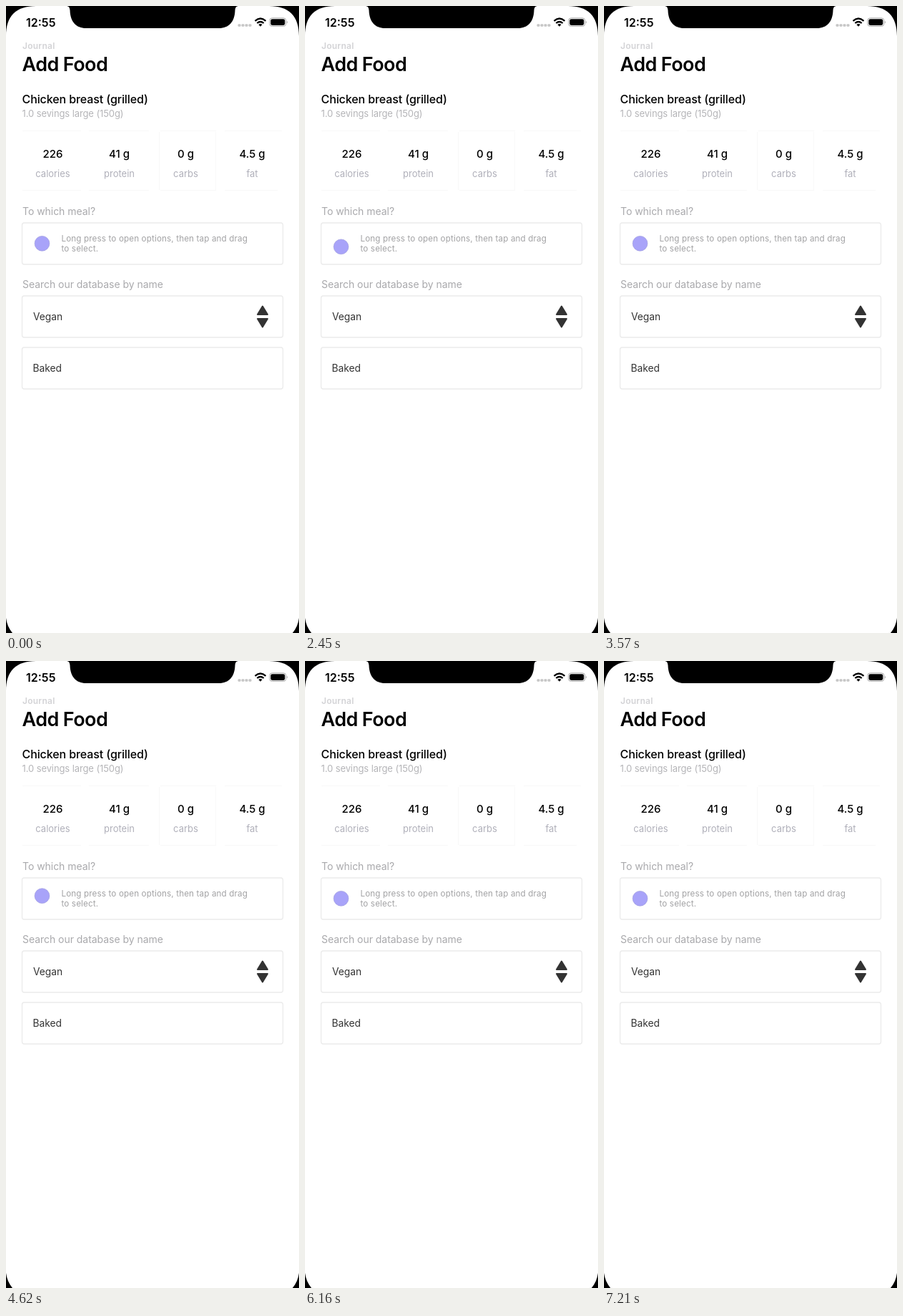
Recreate the animation shown at these times as an HTML page. Size 410 by 876 pixels, loop 8000 ms.

```html
<!DOCTYPE html>
<html lang="en">
<head>
<meta charset="utf-8">
<title>Add Food</title>
<style>
  html, body { margin: 0; width: 100%; height: 100%; overflow: hidden; background: #fff; }
  svg { display: block; width: 410px; height: 876px; }
  text { font-family: Inter, Roboto, sans-serif; fill: #a9a9ac; }
  .time { font-size: 16px; font-weight: 600; fill: #000; }
  .crumb { font-size: 12px; font-weight: 600; fill: #d3d3d6; letter-spacing: .25px; }
  .title { font-size: 27px; font-weight: 600; fill: #000; letter-spacing: -.6px; }
  .food { font-size: 16px; font-weight: 500; fill: #000; letter-spacing: -.1px; }
  .size { font-size: 13px; fill: #b5b5b8; letter-spacing: -.1px; }
  .label { font-size: 14px; letter-spacing: -.04px; }
  .hint { font-size: 11.6px; fill: #a2a2a4; letter-spacing: .16px; }
  .field { font-size: 13.8px; fill: #333; }
  .value { font-size: 15px; font-weight: 500; fill: #000; text-anchor: middle; }
  .unit { font-size: 13px; fill: #b0b0ba; text-anchor: middle; }
  .card { fill: #fff; stroke: #ebebeb; stroke-width: 1.3; }
  .faint { fill: none; stroke: #f8f8f8; stroke-width: 1.2; }
</style>
</head>
<body>
<svg viewBox="0 0 410 876" xmlns="http://www.w3.org/2000/svg">
  <defs>
    <clipPath id="cardClip"><rect x="23" y="302.5" width="365" height="58.5"/></clipPath>
  </defs>
  <rect width="410" height="876" fill="#fff"/>

  <!-- phone bezel and notch -->
  <path d="M0 0H42C14 0 0 14 0 42ZM410 0H368C396 0 410 14 410 42ZM0 855C1 863 4 870 9 876H0ZM410 855C409 863 406 870 401 876H410Z"/>
  <path d="M84 0C88 0 89 2 89.500 6C90 22 98 31 112 31H298C312 31 320 22 320.500 6C321 2 322 0 326 0Z"/>

  <!-- status bar -->
  <text class="time" x="28" y="28.500">12:55</text>
  <g fill="#c6c6c6">
    <rect x="324.500" y="25.300" width="4" height="3.400" rx="1.200"/>
    <rect x="329.500" y="25.300" width="4" height="3.400" rx="1.200"/>
    <rect x="334.500" y="25.300" width="4" height="3.400" rx="1.200"/>
    <rect x="339.500" y="25.300" width="4" height="3.400" rx="1.200"/>
  </g>
  <g fill="none" stroke="#000" stroke-width="2.200">
    <path d="M348.500 20.800Q356 14.200 363.500 20.800"/>
    <path d="M351.300 24Q356 20 360.700 24"/>
  </g>
  <path d="M353.400 26Q356 23.900 358.600 26L356 28.700Z"/>
  <rect x="368.800" y="16.800" width="23" height="11.600" rx="3.600" fill="#fff" stroke="#aaa"/>
  <rect x="370.300" y="18.300" width="20" height="8.600" rx="2.300"/>
  <path d="M393 20.700Q395 22.600 393 24.500Z" fill="#aaa"/>

  <text class="crumb" x="23" y="59.500">Journal</text>
  <text class="title" x="22.500" y="91">Add Food</text>
  <text class="food" x="22.500" y="136">Chicken breast (grilled)</text>
  <text class="size" x="22.500" y="155">1.0 sevings large (150g)</text>

  <path class="faint" d="M23 174.500H105M116 174.500H200M216 174.500H294M306 174.500H386M23 257.500H105M116 257.500H200M216 257.500H294M306 257.500H380M214.500 176V257M293.500 176V257"/>
  <g id="macros"></g>

  <text class="label" x="23" y="292">To which meal?</text>
  <rect class="card" x="22.500" y="303" width="365" height="58" rx="3"/>
  <g clip-path="url(#cardClip)">
    <circle id="dot" cx="50.500" cy="331.800" r="10.400" fill="#a8a3f9" stroke="#a09cdf" stroke-width=".7"/>
    <circle id="ring" cx="50.500" cy="332" r="0" fill="#28b496"/>
  </g>
  <text class="hint" x="77.500" y="329">Long press to open options, then tap and drag</text>
  <text class="hint" x="77.500" y="343">to select.</text>

  <text class="label" x="23" y="394">Search our database by name</text>
  <rect class="card" x="22.500" y="405" width="365" height="58" rx="3"/>
  <text class="field" x="38" y="439">Vegan</text>
  <path d="M359 419.500L366 431H352ZM359 448.500L366 437H352Z" fill="#333" stroke="#333" stroke-width="2" stroke-linejoin="round"/>
  <rect class="card" x="22.500" y="477" width="365" height="58" rx="3"/>
  <text class="field" x="37.500" y="511">Baked</text>
</svg>
<script>
  const LOOP = 8000, STEP = 70, CYCLE = 3640;
  const dot = document.getElementById('dot');
  const ring = document.getElementById('ring');

  const macros = [[65.5, '226', 'calories'], [158.5, '41 g', 'protein'], [251.5, '0 g', 'carbs'], [344.5, '4.5 g', 'fat']];
  document.getElementById('macros').innerHTML = macros.map(([x, value, unit]) =>
    `<text class="value" x="${x}" y="212">${value}</text><text class="unit" x="${x}" y="239">${unit}</text>`).join('');

  const progress = (t, from, to) => Math.min(1, Math.max(0, (t - from) / (to - from)));

  // Leaves through the top of the card, returns from below.
  function dotShift(t) {
    if (t < 1800) return -41 * progress(t, 910, 1260) ** 1.5;
    return 41 * (1 - progress(t, 2310, 2520)) ** 2;
  }

  function draw(ms) {
    const now = Math.floor((ms % LOOP) / STEP) * STEP;
    const t = now % CYCLE;
    dot.setAttribute('transform', `translate(0 ${dotShift(t).toFixed(2)})`);

    const p = progress(t, 2700, 3570);
    ring.setAttribute('r', (28 * (1 - (1 - p) ** 2)).toFixed(2));
    ring.setAttribute('opacity', p < 1 ? (0.115 * Math.sin(Math.PI * p)).toFixed(3) : 0);
  }

  const start = performance.now();
  function tick() {
    draw(performance.now() - start);
    requestAnimationFrame(tick);
  }
  draw(0);
  requestAnimationFrame(tick);
</script>
</body>
</html>
```
